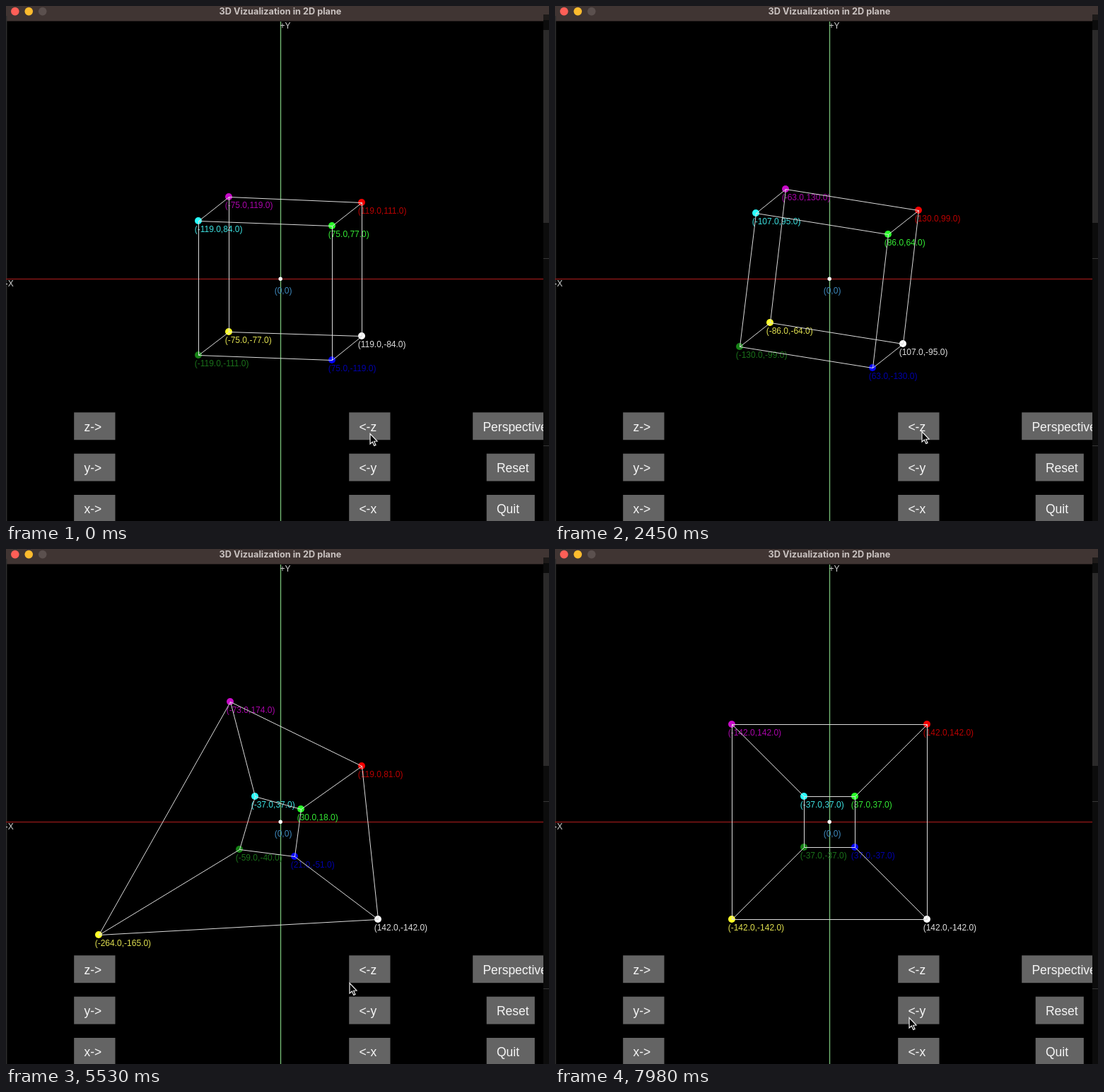
Write an HTML page with a canvas that moves like this. It is 768 px wide and 729 px high and loops after 8 s.

```html
<!DOCTYPE html>
<html lang="en">
<head>
<meta charset="utf-8">
<title>3D Vizualization in 2D plane</title>
<style>
html, body { margin: 0; width: 100%; height: 100%; overflow: hidden; background: #000; }
canvas { display: block; }
</style>
</head>
<body>
<canvas id="stage" width="768" height="729"></canvas>
<script>
const ctx = document.getElementById('stage').getContext('2d');
const W = 768, H = 729, LOOP = 8000, STEP = 70;
const CX = 388.2, CY = 386.2, SCALE = 0.9725, EDGE = 760;
const SANS = '"Liberation Sans", Arial, sans-serif';

// corner signs, dot colour, label colour
const corners = [
  [-1, 1, 1, '#c80ac8', '#a805a8'],
  [1, 1, 1, '#f50000', '#b80000'],
  [1, -1, 1, '#ffffff', '#dedede'],
  [-1, -1, 1, '#ffff28', '#e0e050'],
  [-1, 1, -1, '#28ffff', '#3cdede'],
  [1, 1, -1, '#28ff28', '#34e834'],
  [1, -1, -1, '#0000f5', '#0000a8'],
  [-1, -1, -1, '#168216', '#1a701a']
];

// time, x, y of the pointer tip
const pointer = [
  [350, 515, 605], [1120, 526, 604], [1260, 519, 602], [3220, 519, 602],
  [3500, 578, 624], [3570, 578, 624], [4060, 640, 636], [4410, 717, 591],
  [4620, 717, 591], [5250, 549, 589], [5530, 486, 614], [6090, 517, 701],
  [6230, 517, 710], [6580, 517, 710], [7070, 668, 656], [7350, 704, 655],
  [7420, 704, 655], [7980, 501, 663]
];

// left edge, row, width, caption
const buttons = [
  [96.2, 0, 58.3, 'z->'], [96.2, 1, 58.3, 'y->'], [96.2, 2, 58.3, 'x->'],
  [485.2, 0, 58.3, '<-z'], [485.2, 1, 58.3, '<-y'], [485.2, 2, 58.3, '<-x'],
  [660.2, 0, 120, 'Perspective'], [679.7, 1, 68.1, 'Reset'], [679.7, 2, 68.1, 'Quit']
];

function box(x, y, w, h, color) {
  ctx.fillStyle = color;
  ctx.fillRect(x, y, w, h);
}

function dot(x, y, r, color) {
  ctx.fillStyle = color;
  ctx.beginPath();
  ctx.arc(x, y, r, 0, 2 * Math.PI);
  ctx.fill();
}

function text(str, x, y, font, color) {
  ctx.font = font;
  ctx.fillStyle = color;
  ctx.fillText(str, x, y);
}

function pose(t) {
  if (t >= 7490) return { a: 0, b: 0, c: 0 };
  const clicks = t < 1400 ? 0 : Math.min(9, Math.floor((t - 1400) / 190) + 1);
  return { a: t < 6580 ? 0.18 : 0.2, b: 0.22, c: 0.02 * clicks };
}

function turn(u, v, angle) {
  const c = Math.cos(angle), s = Math.sin(angle);
  return [u * c + v * s, v * c - u * s];
}

function project(p, { a, b, c }, perspective) {
  let [x, y, z] = p;
  [x, y] = turn(x, y, c);
  [x, z] = turn(x, z, b);
  [y, z] = turn(y, z, a);
  const k = perspective ? 100 / (1.7 - z) : 100;
  const px = Math.trunc(x * k), py = Math.trunc(y * k);
  return {
    x: Math.floor(CX + px * SCALE),
    y: Math.floor(CY - py * SCALE),
    label: `(${px.toFixed(1)},${py.toFixed(1)})`
  };
}

function pointerAt(t) {
  const i = pointer.findIndex(k => k[0] > t);
  if (i === 0) return pointer[0].slice(1);
  if (i < 0) return pointer[pointer.length - 1].slice(1);
  const [t0, x0, y0] = pointer[i - 1], [t1, x1, y1] = pointer[i];
  const f = (t - t0) / (t1 - t0);
  return [x0 + (x1 - x0) * f, y0 + (y1 - y0) * f];
}

function drawPointer(x, y) {
  ctx.save();
  ctx.translate(Math.round(x), Math.round(y));
  ctx.beginPath();
  [[0, 0.5], [0, 15], [3.3, 12], [5.8, 17.4], [8, 16.4], [5.6, 11.2], [10, 11]]
    .forEach(([px, py]) => ctx.lineTo(px, py));
  ctx.closePath();
  ctx.fillStyle = '#000';
  ctx.fill();
  ctx.strokeStyle = '#f0f0f0';
  ctx.lineWidth = 1.2;
  ctx.stroke();
  ctx.restore();
}

function drawWindow() {
  box(0, 0, W, H, '#000');
  box(0, 0, W, 21, '#403533');
  box(0, 21, EDGE, 1, '#1c1716');
  box(0, 14, 1.4, H - 14, '#2e2e2e');
  ['#ff5f57', '#febc2e', '#5b504e'].forEach((c, i) => dot(12.8 + i * 19.45, 7.6, 5.8, c));
  ctx.textAlign = 'center';
  text('3D Vizualization in 2D plane', 388, 11.5, 'bold 12.7px Inter, sans-serif', '#c9c2c0');
  ctx.textAlign = 'left';

  box(EDGE, 12, 8, H - 12, '#0c0c0c');
  box(EDGE, 12, 8, 8, '#1d1a19');
  box(EDGE, 34, 8, 273, '#2b2a2a');
  box(EDGE, 357, 8, 1, '#363636');
  box(EDGE, 622, 8, 1, '#363636');
}

function drawAxes() {
  box(0, 385.8, EDGE, 1.4, '#8c1818');
  box(387.8, 22, 1.4, H - 22, '#74b874');
  text('+Y', 387.5, 32, `12px ${SANS}`, '#cfcfcf');
  text('-X', -1.2, 396.5, `12px ${SANS}`, '#cfcfcf');
  text('(0,0)', 379.7, 406.5, `12px ${SANS}`, '#3e88bc');
}

function drawButtons() {
  ctx.save();
  ctx.beginPath();
  ctx.rect(0, 0, EDGE, H);
  ctx.clip();
  for (const [x, row, w, name] of buttons) {
    const y = 575.3 + row * 58.35;
    box(x, y, w, 38.9, '#646464');
    text(name, x + 14.2, y + 26.2, `17.5px ${SANS}`, '#f5f5f5');
  }
  ctx.restore();
}

function drawCube(t) {
  const angles = pose(t);
  const pts = corners.map(c => project(c, angles, t >= 4550));
  pts.forEach((p, i) => dot(p.x, p.y, 5, corners[i][3]));
  pts.forEach((p, i) => text(p.label, p.x - 5.3, p.y + 15.8, `12px ${SANS}`, corners[i][4]));
  dot(CX, CY, 2.7, '#fff');

  ctx.save();
  ctx.translate(0.5, 0.5);
  ctx.strokeStyle = '#dcdcdc';
  ctx.lineWidth = 1;
  ctx.beginPath();
  for (let i = 0; i < 4; i++) {
    const j = (i + 1) % 4;
    for (const [m, n] of [[i, j], [i + 4, j + 4], [i, i + 4]]) {
      ctx.moveTo(pts[m].x, pts[m].y);
      ctx.lineTo(pts[n].x, pts[n].y);
    }
  }
  ctx.stroke();
  ctx.restore();
}

function draw(now) {
  const t = Math.floor((now % LOOP) / STEP) * STEP;
  drawWindow();
  drawAxes();
  drawButtons();
  drawCube(t);
  drawPointer(...pointerAt(t));
}

const start = performance.now();
function tick() {
  draw(performance.now() - start);
  requestAnimationFrame(tick);
}
tick();
</script>
</body>
</html>
```
